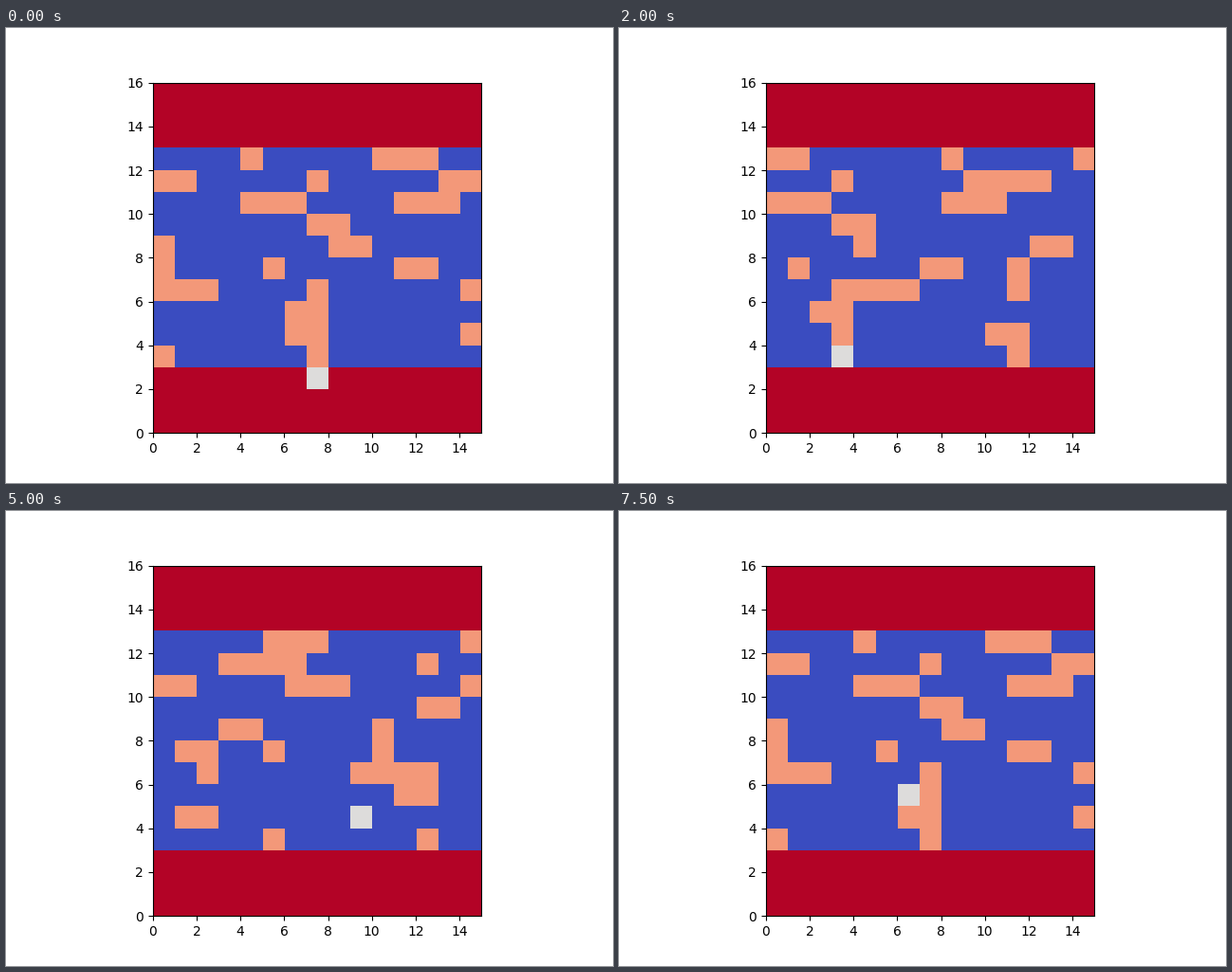
These frames come from a looping animation (640x480 px, 8 s). A matplotlib script:

```python
import numpy as np
import matplotlib.pyplot as plt
from matplotlib.animation import FuncAnimation

COLS, ROWS, STEPS = 15, 16, 16
WATER, FROG, LOG, BANK = 0, 2, 3, 4
FIRST_LANE = 3
HOPS = (0, 4, 11)  # steps at which the frog hops up a lane


def logs(start, *lengths, gap=7):
    """Columns of a lane's logs, whose left ends are `gap` cells apart."""
    return np.concatenate([start + int(k * gap) + np.arange(n)
                           for k, n in enumerate(lengths)])


# From the lowest lane up: left end of the first log, then log lengths.
LANES = [
    logs(0, 1, 1),
    logs(14, 1, 2),
    logs(6, 2),
    logs(7, 1, 4),
    logs(0, 1, 1, 2, gap=5.5),
    logs(8, 2, 1),
    logs(7, 2),
    logs(4, 3, 3),
    logs(7, 1, 4, gap=6),
    logs(4, 1, 3, gap=6),
]


def drift(lane):
    """Neighbouring lanes move in opposite directions."""
    return 1 if lane % 2 else -1


def frog_at(step):
    """The frog rides its log, one cell per step, between hops."""
    col, row = 7, FIRST_LANE - 1
    for s in range(step):
        row += s in HOPS
        col = (col + drift(row - FIRST_LANE)) % COLS
    return col, row


def board(step):
    grid = np.full((ROWS, COLS), BANK)
    for lane, cols in enumerate(LANES):
        row = grid[FIRST_LANE + lane]
        row[:] = WATER
        row[(cols + drift(lane) * step) % COLS] = LOG
    col, row = frog_at(step)
    grid[row, col] = FROG
    return grid


fig, ax = plt.subplots(figsize=(6.4, 4.8), dpi=100)
image = ax.imshow(board(0), cmap="coolwarm", vmin=WATER, vmax=BANK,
                  origin="lower", extent=(0, COLS, 0, ROWS),
                  interpolation="nearest")


def update(step):
    image.set_data(board(step))
    return [image]


anim = FuncAnimation(fig, update, frames=STEPS, interval=500,
                     repeat=True, repeat_delay=0)
plt.show()
```
